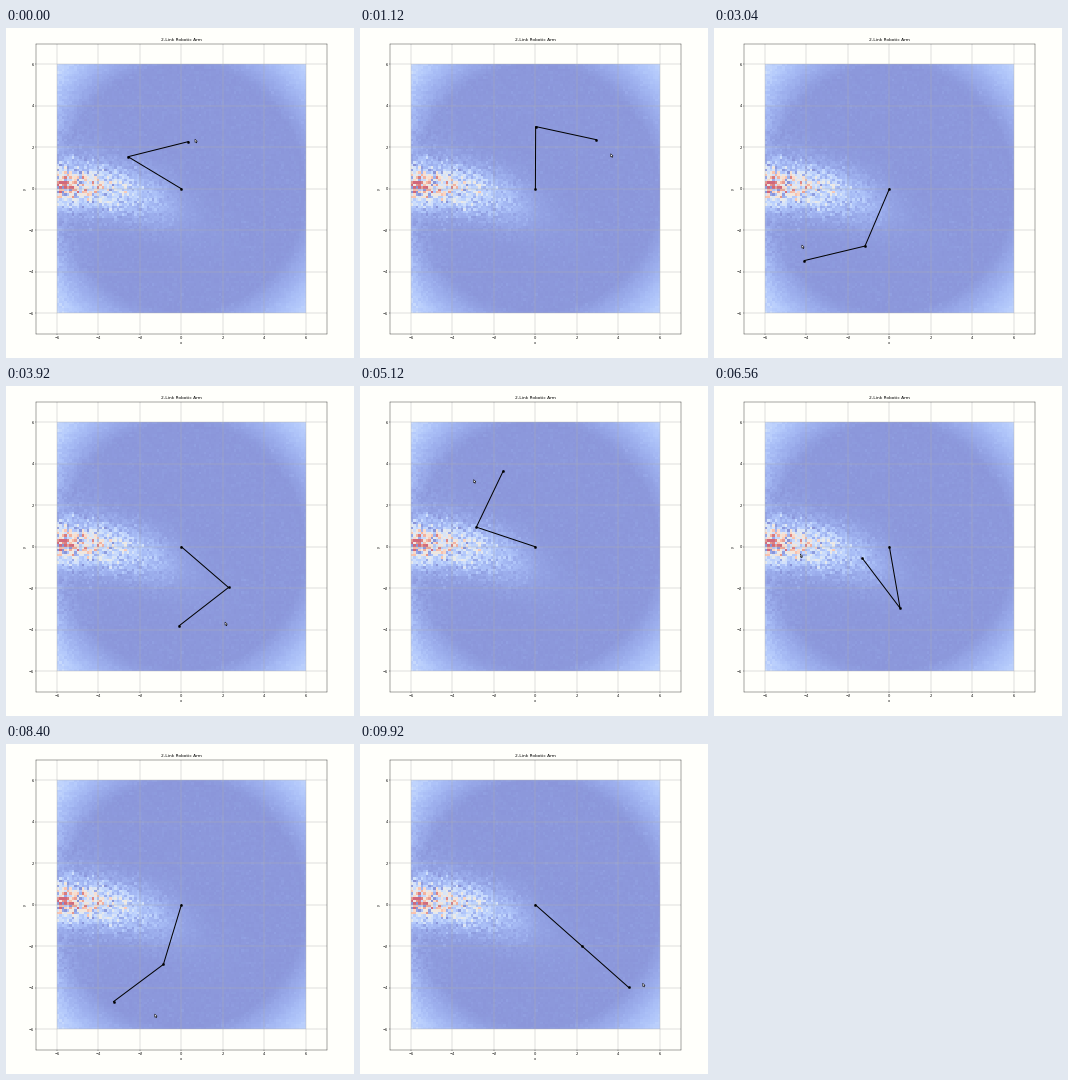
A matplotlib script for the animation above (10 s loop, 348 px wide and 330 px high).

```python
import numpy as np
import matplotlib.pyplot as plt
from matplotlib.animation import FuncAnimation
from matplotlib.patches import Polygon

W, H, DPI = 348, 330, 100
PX = 72 / DPI            # one pixel in points
FRAMES, INTERVAL = 125, 80
UNIT = 20.75             # pixels per data unit
ORIGIN = np.array([175.4, 160.8])
LINK = 3
LAG = 2                  # frames the arm trails the pointer
PAPER = "#fffffb"

# pointer path around the base: frame, angle in degrees, radius
PATH = np.array([
    (-2, 81.5, 2.3), (0, 73, 2.4), (13, 32, 3.9), (25, -106, 5.4),
    (27, -116, 6.1), (35, -137, 5.5), (40, -147, 4.7), (47, -91.5, 3.8),
    (49, -60, 4.3), (52, -38, 4.6), (59, 75, 3.65), (62, 113, 3.97),
    (64, 133, 4.3), (70, 163, 4.4), (76, 180, 4.45), (82, 186, 4.27),
    (91, 194, 4.75), (103, 235, 5.7), (105, 257, 5.5), (115, 300, 6.1),
    (124, 323.4, 6.5)]).T
SLOPE = np.gradient(PATH[1:], PATH[0], axis=1)


def pointer_polar(t):
    """Angle and radius of the pointer, cubic between the path points."""
    x, y = PATH[0], PATH[1:]
    i = np.clip(np.searchsorted(x, t, side="right") - 1, 0, len(x) - 2)
    h = x[i + 1] - x[i]
    s = (t - x[i]) / h
    ease = s * s * (3 - 2 * s)
    return (y[:, i] * (1 - ease) + y[:, i + 1] * ease
            + h * s * (1 - s) * ((1 - s) * SLOPE[:, i] - s * SLOPE[:, i + 1]))


def joint_angles(phi, r):
    """Inverse kinematics, blurred where the angle wraps at 180 degrees."""
    wrap = 1 / (1 + np.exp((180.5 - phi) / 2.2))
    bend = np.degrees(np.arccos(min(r / (2 * LINK), 1)))
    bend += 40 * (4 * wrap * (1 - wrap)) ** 0.3 if wrap > 0.01 else 0
    shoulder = phi - 360 * wrap + np.degrees(np.arccos(min(r / 6, 1)))
    return np.radians([shoulder, shoulder - 2 * bend])


def error_map(n=100):
    rng = np.random.default_rng(4)
    c = (np.arange(n) + 0.5) / n * 12 - 6
    x, y = np.meshgrid(c, c)
    r = np.hypot(x, y)
    u = np.clip(-x / 6, 0, 1)
    right = np.clip(x, 0, 6)
    v = 0.012 + 0.01 * np.abs(rng.normal(size=x.shape))
    v += 0.25 * np.clip((r - 5.9) / 2.5, 0, 1) ** 1.15
    v += 0.1 * np.exp(-(x + 6) / 0.8) * rng.random(x.shape)
    # noisy plume along the negative x axis
    mid = 0.2 - 1.2 * (1 - u) ** 2 - 0.6 * right
    off = (y - mid) ** 2 / 2
    plume = np.exp(-off / (0.9 - 0.35 * u) ** 2)
    amp = (0.05 + 0.5 * u ** 1.2) * np.exp(-right)
    v += amp * plume * (1 + (0.15 + 0.6 * u) * rng.normal(size=x.shape))
    v += 0.1 * u * np.exp(-off) * rng.exponential(size=x.shape)
    return np.clip(v, 0, 1)


fig = plt.figure(figsize=(W / DPI, H / DPI), dpi=DPI, facecolor=PAPER)
half = 7 * UNIT
ax = fig.add_axes([(ORIGIN[0] - half) / W, 1 - (ORIGIN[1] + half) / H,
                   2 * half / W, 2 * half / H], facecolor=PAPER)
ax.imshow(error_map(), extent=(-6, 6, -6, 6), origin="lower", cmap="coolwarm",
          vmin=0, vmax=1, alpha=0.6, interpolation="nearest", aspect="auto")
ax.set(xlim=(-7, 7), ylim=(-7, 7))
ticks = range(-6, 7, 2)
ax.set_xticks(ticks)
ax.set_yticks(ticks)
ax.grid(color="#b0b0b0", lw=0.4 * PX)
ax.tick_params(labelsize=3.6 * PX, length=1.2 * PX, width=0.3 * PX,
               pad=1.2 * PX)
for spine in ax.spines.values():
    spine.set_linewidth(0.35 * PX)


def label(x, y, text, size, **kw):
    fig.text(x / W, 1 - y / H, text, size=size * PX, ha="center",
             va="center", **kw)


label(ORIGIN[0], 12.3, "2-Link Robotic Arm", 4.36)
label(ORIGIN[0], 315.5, "x", 3.6)
label(18.5, ORIGIN[1], "y", 3.6, rotation=90)

arm, = ax.plot([], [], "o-", color="black", lw=PX, ms=2.2 * PX,
               mew=0.4 * PX, zorder=4)
ARROW = np.array([(0, 0), (0, 3.2), (0.8, 2.6), (1.4, 3.8), (1.9, 3.5),
                  (1.4, 2.4), (2.4, 2.2)]) - (1, 2)
ARROW = ARROW / (UNIT, -UNIT)
pointer = Polygon(ARROW, fc="white", ec="black", lw=0.5 * PX, zorder=5)
ax.add_patch(pointer)


def draw(frame):
    angles = joint_angles(*pointer_polar(frame - LAG))
    arm.set_data(np.append(0, np.cumsum(LINK * np.cos(angles))),
                 np.append(0, np.cumsum(LINK * np.sin(angles))))
    phi, r = pointer_polar(frame)
    phi = np.radians(phi)
    pointer.set_xy(ARROW + (r * np.cos(phi), r * np.sin(phi)))
    return arm, pointer


anim = FuncAnimation(fig, draw, frames=FRAMES, interval=INTERVAL,
                     init_func=lambda: draw(0), repeat=True, repeat_delay=0)
plt.show()
```
